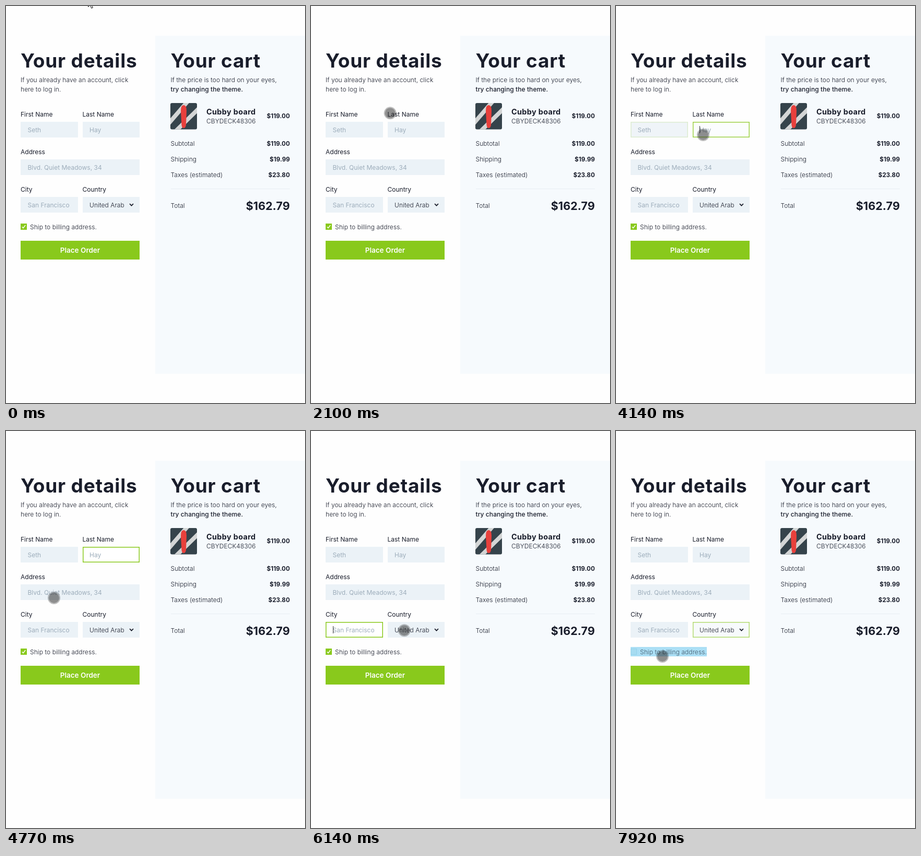
An HTML page that plays this animation: 573x761 px, repeating every 7.99 s.

```html
<!DOCTYPE html>
<html lang="en">
<head>
<meta charset="utf-8">
<title>Checkout form</title>
<style>
html, body { margin: 0; width: 100%; height: 100%; overflow: hidden; background: #fff; }
#stage { position: relative; width: 573px; height: 761px; overflow: hidden; background: #fefefe;
  font: 300 12px/18px Inter, sans-serif; font-optical-sizing: none; letter-spacing: .08px;
  color: #191d2b; cursor: none; }
#stage * { position: absolute; box-sizing: border-box; white-space: pre; }
#stage svg * { position: static; }
.panel { left: 286px; top: 57px; width: 287px; height: 648px; background: #f6fafd; }
.rule { left: 316px; top: 350px; width: 228px; height: 1px; background: #e8eef3; }
.photo { left: 315px; top: 186px; }
.h1 { font-size: 37px; font-weight: 700; letter-spacing: .8px; }
.label, .hint { font-weight: 400; letter-spacing: 0; }
.hint { color: #9dadbb; }
.strong { font-weight: 500; }
.name { font-size: 14.5px; font-weight: 700; letter-spacing: .3px; }
.price { font-size: 11.5px; font-weight: 700; }
.total { font-size: 21.5px; font-weight: 700; }
.field { height: 30px; }
.chevron { left: 236px; top: 378px; }
.button { left: 28px; top: 450px; width: 228px; height: 36px; background: #89c91c; color: #fff;
  font: 600 13.5px/36px Inter, sans-serif; letter-spacing: 0; text-align: center; }
.caret { width: 1px; height: 14px; background: #333; }
.select { left: 28px; top: 414px; width: 146px; height: 18px; background: #abdff5; }
.box { left: 28px; top: 417px; width: 12px; height: 12px; background: #89c91c; }
.box.off { background: #a6dcf1; border: 1px solid #93d2ea; }
.box.off svg { display: none; }
.menu, .shade { left: 145px; top: 396px; width: 209px; height: 130px; border-radius: 7px; }
.menu { background: #fff; border: 1px solid #a9adb0; overflow: hidden; }
.shade { box-shadow: 0 22px 50px rgba(0, 0, 0, .21); }
.item { left: 0; width: 207px; height: 32px; padding-left: 16px; letter-spacing: 0;
  font: 400 16px/32px Inter, sans-serif; }
.item.on { background: #ade0f5; color: #fff; }
.dot { width: 24px; height: 24px; border-radius: 50%; background: rgba(35, 35, 35, .51) padding-box;
  border: 2px solid rgba(0, 0, 0, .25); }
.dot, .arrow { left: 0; top: 0; }
.arrow { overflow: visible; }
</style>
</head>
<body>
<div id="stage">
  <div class="panel"></div>
  <div class="rule"></div>
  <svg class="photo" width="51" height="51">
    <clipPath id="round"><rect width="51" height="50.5" rx="3"/></clipPath>
    <g clip-path="url(#round)">
      <rect width="51" height="51" fill="#35434b"/>
      <path d="M-4 40 L34 -4 M10 54 L54 11" stroke="#d3d5d5" stroke-width="8"/>
      <path d="M20 15 Q20 4 25.500 4 Q31 4 31 15 L30 42 Q29 48 25.500 48 Q22 48 21.500 42Z" fill="#e8403c"/>
    </g>
  </svg>
  <div class="button">Place Order</div>
</div>
<script>
const LOOP = 7990, FADE = 160, BLINK = 530;
const LEFT = 28, RIGHT = 315.5, EDGE = 544;
const stage = document.getElementById('stage');

function add(cls, style = {}, text = '', parent = stage) {
  const el = document.createElement('div');
  el.className = cls;
  el.textContent = text;
  Object.assign(el.style, style);
  parent.append(el);
  return el;
}
function svg(cls, w, h, body, parent = stage) {
  parent.insertAdjacentHTML('beforeend', `<svg class="${cls}" width="${w}" height="${h}">${body}</svg>`);
  return parent.lastElementChild;
}
// Text centred vertically on y
function text(str, x, y, cls = '') {
  return add(cls, { left: x + 'px', top: y - 9 + 'px' }, str);
}
function amount(str, y, cls = 'price') {
  return add(cls, { right: 573 - EDGE + 'px', top: y - 9 + 'px' }, str);
}
const show = (el, on) => { el.style.visibility = on ? 'visible' : 'hidden'; };
const clamp = (v, lo = 0, hi = 1) => Math.max(lo, Math.min(hi, v));
const smooth = k => k * k * (3 - 2 * k);

// Each click focuses the next field; the last one closes the menu
const clicks = [2630, 4010, 4850, 5640, 6480, 7860];
const [openAt, closeAt] = clicks.slice(-2);

// Column, row, span, label, hint
const fields = [
  [0, 0, 1, 'First Name', 'Seth'],
  [1, 0, 1, 'Last Name', 'Hay'],
  [0, 1, 2, 'Address', 'Blvd. Quiet Meadows, 34'],
  [0, 2, 1, 'City', 'San Francisco'],
  [1, 2, 1, 'Country', '']
].map(([col, row, span, label, hint], i) => {
  const x = LEFT + 118.5 * col, y = 222 + 72 * row;
  text(label, x, y - 14, 'label');
  const el = add('field', { left: x + 'px', top: y + 'px', width: 118.5 * span - 9 + 'px' });
  text(hint || 'United Arab', x + 13.5, y + 15.5, hint ? 'hint' : '');
  const caret = hint && add('caret', { left: Math.round(x + 13.5) + 'px', top: y + 8 + 'px' });
  return { el, caret, from: clicks[i], to: clicks[i + 1] };
});
svg('chevron', 9, 7, '<path d="M1 1.200 L4.500 4.700 L8 1.200" fill="none" stroke="#191d2b" stroke-width="1.700"/>');

text('Your details', LEFT, 105, 'h1');
text('If you already have an account, click\nhere to log in.', LEFT, 142);
text('Your cart', RIGHT, 105, 'h1');
text('If the price is too hard on your eyes,', RIGHT, 142);
text('try changing the theme.', RIGHT, 160, 'strong');
text('Cubby board', 384, 203, 'name');
text('CBYDECK48306', 384, 221);
amount('$119.00', 211);
[['Subtotal', '$119.00'], ['Shipping', '$19.99'], ['Taxes (estimated)', '$23.80']].forEach(([name, sum], i) => {
  text(name, RIGHT, 264 + 30 * i);
  amount(sum, 264 + 30 * i);
});
text('Total', RIGHT, 383);
amount('$162.79', 382.5, 'total');

const mark = add('select');
const box = add('box');
svg('', 12, 12, '<path d="M2.800 6.300 L5 8.700 L9.200 3" fill="none" stroke="#fff" stroke-width="1.400"/>', box);
const ship = text('Ship to billing address.', 46, 424);

const shade = add('shade');
const menu = add('menu');
const items = ['United States of America', 'United Arab Emirates', 'North Macedonia', 'Germany']
  .map((s, i) => add('item', { top: 32 * i + 'px' }, s, menu));

const dot = add('dot');
const arrow = svg('arrow', 14, 22,
  '<path d="M.5 .5 V16.500 L4.200 13.200 L6.800 19.300 L9.300 18.200 L6.800 12.200 H11.500Z" fill="#fff" stroke="#111"/>');

// Eased pointer moves: start, end, x, y, sideways bend
const wake = 660, leave = 7180;
const moves = [
  [wake, 1410, 201, 172.5, -30],
  [1410, 1550, 295, 140],
  [1620, 2440, 67, 244],
  [2650, 3220, 181, 247],
  [3900, 4140, 167, 247],
  [4200, 4710, 92, 320],
  [4900, 5500, 81, 383],
  [5600, 6340, 200, 382],
  [openAt, 6900, 196.5, 436],
  [6920, leave, 187, 501],
  [7220, 7660, 89, 432]
];
function pointer(t) {
  let x = 157, y = -15;
  for (const [from, to, tx, ty, bend = 0] of moves) {
    const k = smooth(clamp((t - from) / (to - from)));
    x += (tx - x) * k + bend * Math.sin(Math.PI * k);
    y += (ty - y) * k;
  }
  return [x, y];
}

function draw(t) {
  for (const f of fields) {
    const k = clamp((t - f.from) / FADE) - clamp((t - f.to) / FADE);
    f.el.style.background = `rgb(${235 + 20 * k}, ${242 + 13 * k}, ${247 + 8 * k})`;
    f.el.style.boxShadow = `inset 0 0 0 1.5px rgba(137, 201, 28, ${k})`;
    if (f.caret) show(f.caret, t >= f.from && t < f.to && Math.floor((t - f.from) / BLINK) % 2 === 0);
  }

  const [x, y] = pointer(t);
  const open = t >= openAt && t < closeAt, done = t >= closeAt;
  show(menu, open);
  show(shade, open);
  const row = clamp(Math.floor((pointer(Math.min(t, leave))[1] - 397) / 32), 1, 3);
  items.forEach((el, i) => el.classList.toggle('on', i === row));
  show(mark, done);
  box.classList.toggle('off', done);
  ship.style.color = done ? '#42586a' : '';

  const native = t < wake || (open && x > 145);
  show(arrow, native);
  show(dot, !native);
  arrow.style.transform = `translate(${x}px, ${y}px)`;
  dot.style.transform = `translate(${x - 12}px, ${y - 12}px)`;
}

const start = performance.now();
function tick() {
  draw((performance.now() - start) % LOOP);
  requestAnimationFrame(tick);
}
tick();
</script>
</body>
</html>
```
